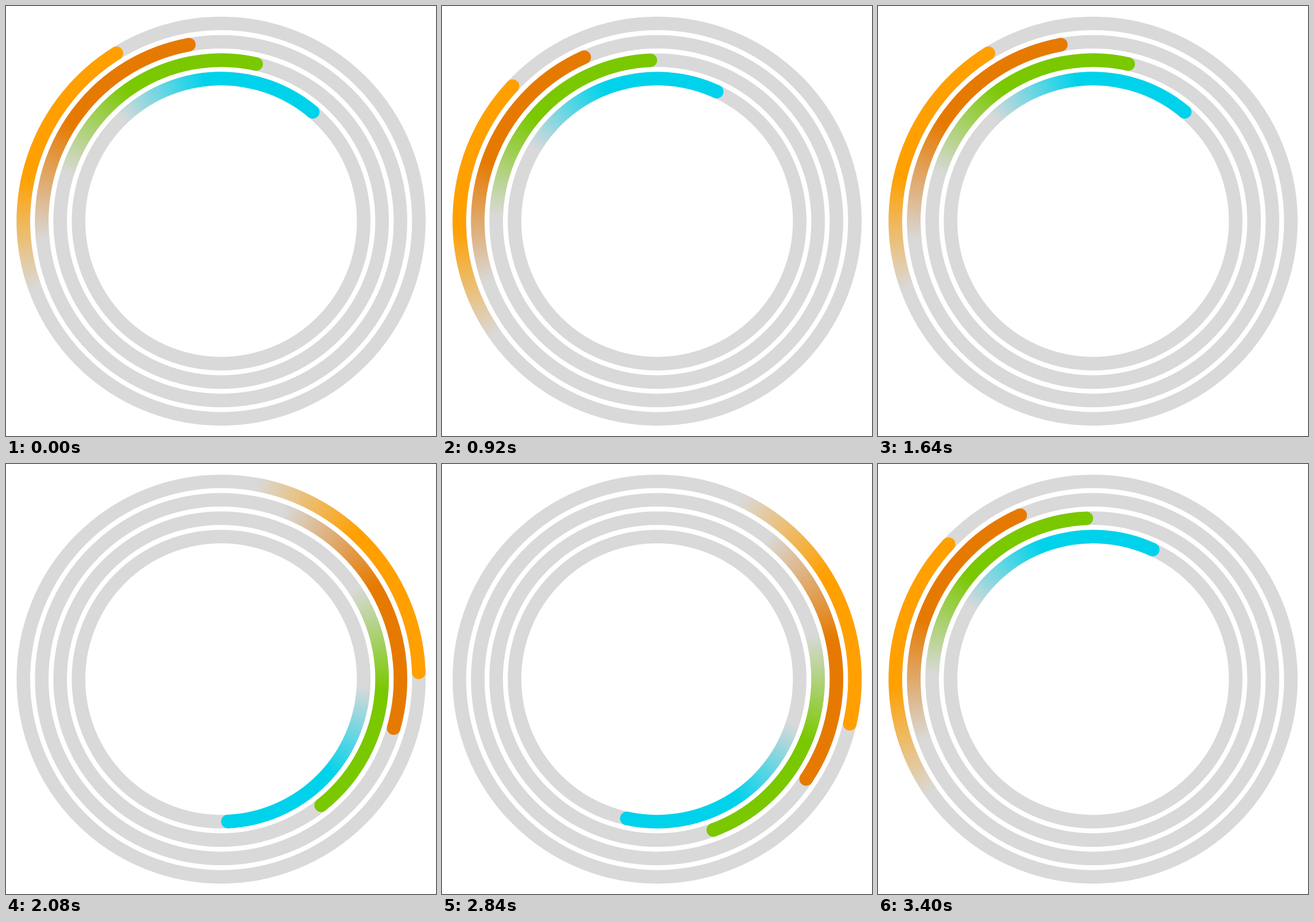
Animation of 748 by 748 pixels, one loop 3.44 s. Source, as an HTML page with a canvas:

```html
<!DOCTYPE html>
<html>
<head>
<meta charset="utf-8">
<style>
  html, body { margin: 0; width: 100%; height: 100%; overflow: hidden; background: #fff; }
  canvas { display: block; width: 100vw; height: 100vh; }
</style>
</head>
<body>
<canvas id="stage" width="748" height="748"></canvas>
<script>
const ctx = document.getElementById('stage').getContext('2d');
const CENTER = 374.2, WIDTH = 23.6, GREY = '#d9d9d9';
const FRAME = 40, FRAMES = 86, TURN = 24;

// quarters: steps of the turn at which the tip passes 90, 180, 270 and 360 degrees
const rings = [
  { r: 344, color: '#ffa000', tail: 80, fade: 33, quarters: [6, 12, 18, 24] },
  { r: 312, color: '#e67a00', tail: 88, fade: 39, quarters: [5, 10, 16, 22.6] },
  { r: 280, color: '#7ac800', tail: 88, fade: 38, quarters: [3, 8, 14, 21] },
  { r: 248, color: '#00d2eb', tail: 87, fade: 38, quarters: [1.1, 6, 12, 19.2] }
];

const rad = deg => (deg - 90) * Math.PI / 180;

// Steady spin with a burst of speed in the middle; six turns per loop
function stepAt(frame) {
  const u = Math.min(1, Math.max(0, (frame - 20.9) / 38.7));
  return Math.round(22 + frame + 58 * u * u * (3 - 2 * u)) % TURN;
}

function tipAngle(step, q) {
  const marks = [q[3] - TURN, ...q, q[0] + TURN];
  let i = 0;
  while (step >= marks[i + 1]) i++;
  return 90 * (i + (step - marks[i]) / (marks[i + 1] - marks[i]));
}

function strokeArc(r, from, to, style) {
  ctx.beginPath();
  ctx.arc(CENTER, CENTER, r, from, to);
  ctx.strokeStyle = style;
  ctx.stroke();
}

function drawRing({ r, color, tail, fade, quarters }, step) {
  strokeArc(r, 0, 2 * Math.PI, GREY);
  const tip = tipAngle(step, quarters);
  const start = rad(tip - tail);
  const head = rad(tip) - WIDTH / 2 / r;

  const paint = ctx.createConicGradient(start, CENTER, CENTER);
  paint.addColorStop(0, GREY);
  paint.addColorStop(fade / 360, color);
  paint.addColorStop(0.6, color);
  paint.addColorStop(0.6, GREY);
  strokeArc(r, start, head, paint);

  ctx.beginPath();
  ctx.arc(CENTER + r * Math.cos(head), CENTER + r * Math.sin(head), WIDTH / 2, 0, 2 * Math.PI);
  ctx.fillStyle = color;
  ctx.fill();
}

function draw(now) {
  const step = stepAt(Math.floor(now / FRAME) % FRAMES);
  ctx.fillStyle = '#fff';
  ctx.fillRect(0, 0, 748, 748);
  ctx.lineWidth = WIDTH;
  for (const ring of rings) drawRing(ring, step);
}

let began;
function tick(now) {
  began ??= now;
  draw(now - began);
  requestAnimationFrame(tick);
}
draw(0);
requestAnimationFrame(tick);
</script>
</body>
</html>
```
